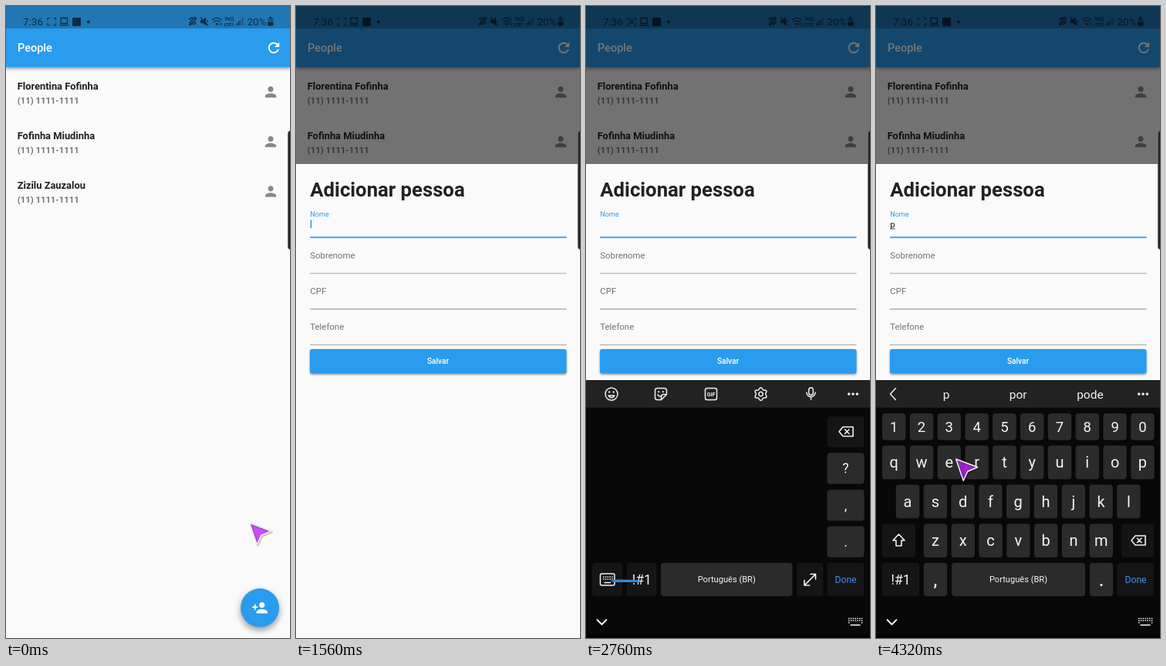
Recreate the animation shown at these times as an HTML page with a canvas. Size 368x816 px, loop 4.44 s.

```html
<!DOCTYPE html>
<html lang="pt-BR">
<head>
<meta charset="utf-8">
<title>People</title>
<style>
html, body { margin: 0; width: 100%; height: 100%; overflow: hidden; background: #fafafa; }
canvas { display: block; width: 368px; height: 816px; }
</style>
</head>
<body>
<canvas id="stage"></canvas>
<script>
const W = 368, H = 816, LOOP = 4440, STEP = 120;
const BLUE = '#2a9cee', INK = '#0f2c43';
const canvas = document.getElementById('stage');
const ctx = canvas.getContext('2d');
const dpr = window.devicePixelRatio || 1;
canvas.width = W * dpr;
canvas.height = H * dpr;

const people = ['Florentina Fofinha', 'Fofinha Miudinha', 'Zizilu Zauzalou'];
const phone = '(11) 1111-1111';

const head = 'c2.21 0 4-1.79 4-4s-1.79-4-4-4-4 1.79-4 4 1.79 4 4 4z';
const body = 'c-2.67 0-8 1.34-8 4v2h16v-2c0-2.66-5.33-4-8-4z';
const icons = {
  person: new Path2D('M12 12' + head + 'm0 2' + body),
  add: new Path2D('M15 12' + head + 'm-9-2V7H4v3H1v2h3v3h2v-3h3v-2H6zm9 4' + body),
  reload: new Path2D('M17.65 6.35C16.2 4.9 14.21 4 12 4c-4.42 0-7.99 3.58-7.99 8s3.57 8 7.99 8c3.73 0 6.84-2.55 7.73-6h-2.08c-.82 2.33-3.04 4-5.65 4-3.31 0-6-2.69-6-6s2.69-6 6-6c1.66 0 3.14.69 4.22 1.78L13 11h7V4l-2.35 2.35z'),
  cursor: new Path2D('M0 0L28 10.5L15 16L9.5 28Z')
};

// Pointer path: time, x, y of the tip
const path = [
  [0, 315, 667], [120, 317, 684], [480, 330, 771], [720, 330, 764], [960, 330, 762],
  [1200, 333, 763], [1680, 320, 776], [1920, 315, 782], [2040, 318, 783], [2280, 180, 772],
  [2520, 36, 741], [2880, 40, 735], [3120, 95, 651], [3480, 338, 590], [3720, 338, 590],
  [4200, 121, 585], [4320, 103, 584.5], [LOOP, 103, 584.5]
];

const clamp = v => Math.max(0, Math.min(1, v));
const easeOut = v => 1 - Math.pow(1 - clamp(v), 3);
const mix = (a, b, k) => a + (b - a) * k;

function rect(x, y, w, h, color, r = 0) {
  ctx.fillStyle = color;
  ctx.beginPath();
  ctx.roundRect(x, y, w, h, r);
  ctx.fill();
}

function disc(x, y, r, color) {
  ctx.fillStyle = color;
  ctx.beginPath();
  ctx.arc(x, y, r, 0, 7);
  ctx.fill();
}

function stroke(d, color, width = 1.5) {
  ctx.strokeStyle = color;
  ctx.lineWidth = width;
  ctx.lineCap = ctx.lineJoin = 'round';
  ctx.stroke(new Path2D(d));
}

function text(s, x, y, size, color, weight = 400, align = 'left') {
  ctx.font = `${weight} ${size}px Roboto, sans-serif`;
  ctx.textAlign = align;
  ctx.fillStyle = color;
  ctx.fillText(s, x, y);
}

function at(x, y, draw, scale = 1) {
  ctx.save();
  ctx.translate(x, y);
  ctx.scale(scale, scale);
  draw();
  ctx.restore();
}

function shadow(blur, dy, alpha, draw) {
  ctx.save();
  ctx.shadowColor = `rgba(0,0,0,${alpha})`;
  ctx.shadowBlur = blur * dpr;
  ctx.shadowOffsetY = dy * dpr;
  draw();
  ctx.restore();
}

function icon(name, x, y, color) {
  const k = 0.893;
  at(x - 12 * k, y - 12 * k, () => {
    ctx.fillStyle = color;
    ctx.fill(icons[name]);
  }, k);
}

function statusBar(t) {
  rect(0, 0, W, 29, '#2077b4');
  text('7:36', 22, 25, 13.5, INK);
  stroke('M54 18v-2.5h2.5M62 15.5h2.5V18M64.5 22.5V25H62M56.5 25H54v-2.5', INK, 1.1);
  if (t % 1080 >= 540 && t < 4140) {
    stroke('M57.2 18.3h4.2v4.2h-4.2z', INK, 1);
    disc(59.3, 20.4, 1.1, INK);
  }
  stroke('M71 15.5h8.5v7h-8.5zM69.5 24.8h11.5', INK, 1.3);
  rect(86, 15, 11, 11, INK, 1);
  disc(106.8, 20.4, 1.9, INK);

  stroke('M238 24.5l1-3.5 5.5-6.5 2 1.8-5.5 6.5zM237.5 17l4-2M243 24l3-3', INK, 1.6);
  ctx.fillStyle = INK;
  ctx.fill(new Path2D('M252 18h3l4-3.5v11L255 22h-3z'));
  stroke('M252.5 15l9 10M261 18.5v2', INK, 1.2);
  stroke('M267.5 17.8q5.7-4.8 11.4 0M269.5 20.3q3.7-3 7.4 0', INK, 1.3);
  disc(273.2, 23.2, 1.5, INK);
  stroke('M277 25v-3M279.2 22v3', INK, 0.8);
  text('Vo))', 283.5, 19, 6.3, INK, 700);
  text('LTE1', 282.5, 25.5, 5.8, INK, 700);
  for (let i = 0; i < 4; i++) {
    const h = 3 + i * 2.4;
    ctx.globalAlpha = i < 2 ? 1 : 0.5;
    rect(298.5 + i * 2.5, 25 - h, 1.5, h, INK);
  }
  ctx.globalAlpha = 1;
  text('20%', 312.5, 25, 13.5, INK);
  rect(341, 14.3, 3.4, 2, INK);
  ctx.globalAlpha = 0.45;
  rect(339, 15.5, 7.4, 10, INK, 1);
  ctx.globalAlpha = 1;
  rect(339, 21, 7.4, 4.5, INK, 1);
}

function home(t) {
  rect(0, 0, W, H, '#fafafa');
  shadow(4, 1.5, 0.4, () => rect(0, 20, W, 59, BLUE));
  statusBar(t);
  text('People', 15, 59, 14.46, '#fff', 500);
  icon('reload', 347, 54, '#fff');
  people.forEach((name, i) => {
    const y = i * 64.2;
    text(name, 14.7, 107.5 + y, 12.86, '#1f1f1f', 700);
    text(phone, 14.7, 126 + y, 11.3, '#757575', 700);
    icon('person', 343, 111 + y, '#878787');
  });
  shadow(8, 4, 0.4, () => disc(329, 777, 25, BLUE));
  icon('add', 329, 777, '#fff');
}

function sheet(t) {
  const open = easeOut((t - 1250) / 290);
  if (t < 1320) return;
  rect(0, 0, W, H, `rgba(0,0,0,${0.54 * open})`);
  at(0, (1 - open) * 612, () => {
    rect(0, 204, W, 612, '#fafafa');
    text('Adicionar pessoa', 18.3, 246, 25.7, '#212121', 700);
    const float = easeOut((t - 1360) / 300);
    text('Nome', 18.3, mix(280, 271.5, float), mix(11.4, 9, float), float > 0.3 ? BLUE : '#737373');
    rect(18, 297.8, 332.5, 1.6, BLUE);
    ['Sobrenome', 'CPF', 'Telefone'].forEach((label, i) => {
      text(label, 18.3, 326 + i * 46.2, 11.4, '#737373');
      rect(18, 344.7 + i * 46.1, 332.5, 0.9, '#8a8a8a');
    });
    shadow(3, 1.5, 0.4, () => rect(18, 443, 332.5, 31.6, BLUE, 3));
    text('Salvar', 184, 462, 10.1, '#fff', 500, 'center');

    const typed = t >= 3600;
    if (typed) {
      text('p', 18.3, 286, 11.5, '#212121');
      rect(18.3, 287.4, 6.4, 0.8, '#212121');
    }
    const phase = typed ? t - 3600 : (t + 760) % 1000;
    if (phase < 500) rect(typed ? 25 : 18.6, 276.3, 1.6, 10.6, BLUE);
  });
}

function key(x, y, w, h, label = '', size = 19.5, dark = false, color = '#f4f4f4') {
  rect(x, y, w, h, dark ? '#151515' : '#2b2b2b', 4);
  if (label) text(label, x + w / 2, y + h / 2 + size * 0.35, size, color, 400, 'center');
}

function backspace(x, y) {
  stroke(`M${x - 9} ${y}l5-6h13v12h-13zM${x - 1.5} ${y - 2.7}l5.4 5.4m0-5.4l-5.4 5.4`, '#f4f4f4', 1.6);
}

function dots() {
  for (const x of [340.7, 346, 351.3]) disc(x, 501, 1.8, '#eee');
}

function toolbar(t) {
  const c = '#eee';
  rect(0, 483, W, 35.5, '#222');
  dots();
  if (t >= 3720) {
    stroke('M25.5 493.5L18.5 501L25.5 508.5', c, 1.5);
    ['p', 'por', 'pode'].forEach((s, i) => text(s, 91 + i * 93.2, 506.5, 15.5, '#f4f4f4', 400, 'center'));
    return;
  }
  at(33, 501, () => {
    stroke('M-8 0a8 8 0 1 0 16 0a8 8 0 1 0-16 0M-4 2q4 5.5 8 0z', c);
    disc(-2.8, -2.6, 1.2, c);
    disc(2.8, -2.6, 1.2, c);
  });
  at(97, 501, () => {
    stroke('M-4.5-7.5h9q3 0 3 3v5l-7 7h-5q-3 0-3-3v-9q0-3 3-3M7.5 .5h-4q-3 0-3 3v4M-4 1q1.5 2.5 4 2', c);
    disc(-2.8, -2.8, 1.1, c);
    disc(2.8, -2.8, 1.1, c);
  });
  at(162, 501, () => {
    stroke('M-5-7.5h10q2.5 0 2.5 2.5v10q0 2.5-2.5 2.5h-10q-2.5 0-2.5-2.5v-10q0-2.5 2.5-2.5', c);
    text('GIF', 0, 2.5, 7, c, 700, 'center');
  });
  at(226.5, 501, () => {
    let d = '';
    for (let i = 0; i < 48; i++) {
      const a = i / 48 * Math.PI * 2, r = 7.2 + 1.1 * Math.cos(a * 6 + Math.PI);
      d += (i ? 'L' : 'M') + r * Math.cos(a) + ' ' + r * Math.sin(a);
    }
    stroke(d + 'ZM-2.7 0a2.7 2.7 0 1 0 5.4 0a2.7 2.7 0 1 0-5.4 0', c);
  });
  at(291.5, 500, () => stroke('M-2.8-4.5a2.8 2.8 0 0 1 5.6 0v4a2.8 2.8 0 0 1-5.6 0zM-5.6-1a5.6 5.6 0 0 0 11.2 0M0 4.8v3.4', c));
}

function keyGrid(x, y, cols) {
  for (let r = 0; r < 2; r++)
    for (let i = 0; i < cols; i++) rect(x + i * 2.8, y + r * 2.8, 1.5, 1.5, '#eee');
}

function handwriting(t) {
  key(312.5, 530, 48, 39.5, '', 0, true);
  backspace(337, 549.5);
  ['?', ',', '.'].forEach((s, i) => key(312.5, 577 + i * 47.4, 48, 40, s, 17.5));
  key(8, 719, 39, 43, '', 0, true);
  stroke('M20.5 733h14.5q2 0 2 2v11q0 2-2 2h-14.5q-2 0-2-2v-11q0-2 2-2M24 744.5h7.5', '#f4f4f4');
  keyGrid(22, 736.5, 5);
  key(53, 719, 38.5, 43, '!#1', 17.5, true);
  key(97, 719, 170.5, 43, 'Português (BR)', 11.1);
  key(273, 719, 34.3, 43, '', 0, true);
  stroke('M283 748l14.5-14.5M291 733.5h6.5v6.5M283 741.5v6.5h6.5', '#f4f4f4', 1.6);
  key(312.5, 719, 48, 43, 'Done', 12.2, true, '#3f8fe6');
  if (t >= 2640) {
    const end = t < 2760 ? 48 : 68;
    ctx.fillStyle = '#2f86d6';
    ctx.fill(new Path2D(`M31 742L40 740.5L${end} 741q1.5 1.5 0 3L36 744Z`));
  }
}

function qwerty() {
  const rows = [['1234567890', 8, 526, 34.5, 18.5], ['qwertyuiop', 8, 567.5, 43.5, 20],
    ['asdfghjkl', 25.8, 618, 43.5, 20], ['zxcvbnm', 61.8, 668.5, 43.5, 20]];
  for (const [chars, x, y, h, size] of rows)
    [...chars].forEach((c, i) => key(x + i * 35.8, y, 30.4, h, c, size));
  key(8, 668.5, 43, 43.5, '', 0, true);
  stroke('M29.5 682l-7.5 8h4v7h7v-7h4z', '#f4f4f4', 1.6);
  key(318, 668.5, 42.5, 43.5, '', 0, true);
  backspace(340, 690);
  key(8, 719, 48, 43, '!#1', 17.5, true);
  key(61.8, 719, 30.4, 43);
  text(',', 77, 749, 22, '#f4f4f4', 500, 'center');
  key(98, 719, 173, 43, 'Português (BR)', 11.1);
  key(276.8, 719, 30.4, 43);
  text('.', 292, 749, 22, '#f4f4f4', 500, 'center');
  key(312.5, 719, 48, 43, 'Done', 12.2, true, '#3f8fe6');
}

function keyboard(t) {
  if (t < 1680) return;
  const dy = t >= 2040 ? 0 : t >= 1920 ? 2 : t >= 1800 ? 46 : 200;
  at(0, dy, () => {
    rect(0, 483, W, 333, '#080808');
    toolbar(t);
    if (t < 2880) handwriting(t);
    else qwerty();
  });
  at(0, dy > 2 ? dy : 0, () => {
    stroke('M14.5 792.5l6 6 6-6', '#f4f4f4', 1.8);
    keyGrid(340, 790, 7);
    rect(340, 795.6, 1.5, 1.5, '#eee');
    rect(356.8, 795.6, 1.5, 1.5, '#eee');
    rect(342.5, 798.5, 13, 1.6, '#eee');
    rect(0, 812, W, 4, '#000');
  });
}

function edgePanel() {
  ctx.fillStyle = '#222';
  ctx.strokeStyle = 'rgba(150,150,150,.7)';
  ctx.lineWidth = 0.8;
  ctx.beginPath();
  ctx.roundRect(365.2, 161, 10, 153.5, 4);
  ctx.fill();
  ctx.stroke();
}

function pointer(t) {
  if ((t >= 1440 && t < 1680) || (t >= 2640 && t < 2880)) return;
  const i = path.findIndex(p => p[0] > t);
  const [t0, x0, y0] = path[i - 1], [t1, x1, y1] = path[i];
  const k = (t - t0) / (t1 - t0);
  at(mix(x0, x1, k) + 0.7, mix(y0, y1, k) + 0.5, () => {
    ctx.fillStyle = 'rgba(190,36,245,.8)';
    ctx.fill(icons.cursor);
    ctx.lineJoin = 'round';
    ctx.lineWidth = 1.5;
    ctx.strokeStyle = '#f6f0fa';
    ctx.shadowColor = 'rgba(0,0,0,.4)';
    ctx.shadowBlur = 2 * dpr;
    ctx.shadowOffsetX = ctx.shadowOffsetY = dpr;
    ctx.stroke(icons.cursor);
  });
}

function draw(t) {
  ctx.setTransform(dpr, 0, 0, dpr, 0, 0);
  home(t);
  sheet(t);
  keyboard(t);
  edgePanel();
  pointer(t);
}

const start = performance.now();
function tick() {
  const t = (performance.now() - start) % LOOP;
  draw(Math.floor(t / STEP) * STEP);
  requestAnimationFrame(tick);
}
tick();
</script>
</body>
</html>
```
